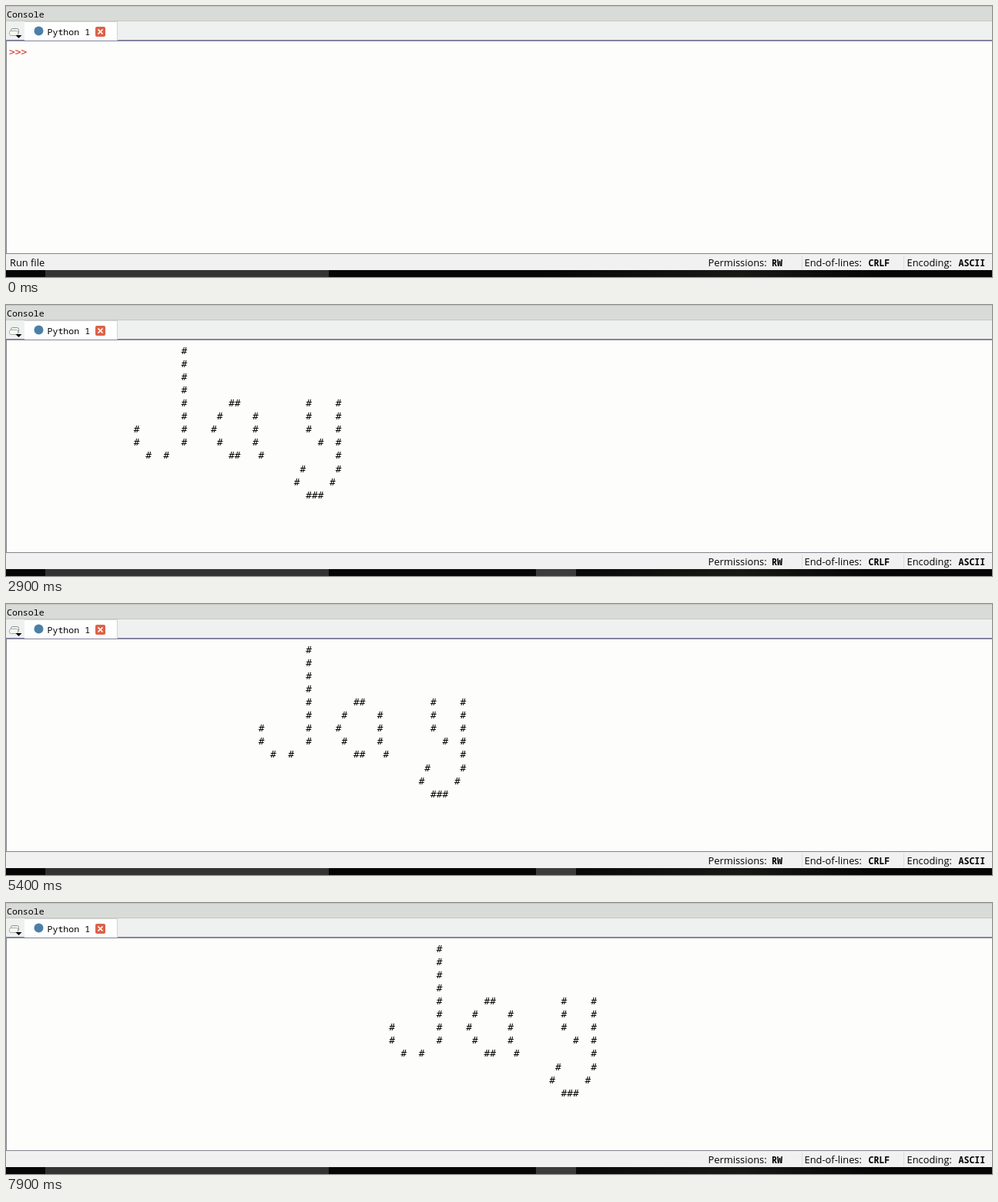
Write an HTML page with a canvas that moves like this. It is 1280x353 px and loops after 8000 ms.

```html
<!DOCTYPE html>
<html lang="en">
<head>
<meta charset="utf-8">
<title>Console</title>
<style>
  html, body { margin: 0; width: 100%; height: 100%; overflow: hidden; background: #fff; }
  canvas { display: block; width: 1280px; height: 353px; }
</style>
</head>
<body>
<canvas id="stage" width="1280" height="353"></canvas>
<script>
const ctx = document.getElementById('stage').getContext('2d');
const LOOP = 8000;
const CODE = '12.8px "DejaVu Sans Mono", monospace';
const TITLE = '11.6px "Noto Sans Mono", monospace';
const LABEL = '12.85px "Open Sans", sans-serif';
const VALUE = 'bold 11.6px "Noto Sans Mono", monospace';
const CELL = 7.706, LINE = 17.1, LEFT = 4, BASE = 63.6;

const art = [
  '        #',
  '        #',
  '        #',
  '        #',
  '        #       ##           #    #',
  '        #     #     #        #    #',
  '#       #    #      #        #    #',
  '#       #     #     #          #  #',
  '  #  #          ##   #            #',
  '                            #     #',
  '                           #     #',
  '                             ###'
];

// [time, indent]: the printing speed wavers a little
const pace = [[600, 0], [900, 3], [2000, 13], [3800, 29], [4600, 35],
              [4800, 37], [6100, 49], [7300, 58], [7900, 64], [8000, 65]];
const ART_START = 600, HINT_END = 1500, BUTTON_START = 300;

function indentAt(t) {
  let i = 1;
  while (i < pace.length - 1 && t >= pace[i][0]) i++;
  const [t0, c0] = pace[i - 1], [t1, c1] = pace[i];
  return Math.floor(c0 + (c1 - c0) * (t - t0) / (t1 - t0) + 1e-6);
}

function rect(x, y, w, h, color) {
  ctx.fillStyle = color;
  ctx.fillRect(x, y, w, h);
}

function text(str, x, y, font, color = '#000') {
  ctx.font = font;
  ctx.fillStyle = color;
  ctx.fillText(str, x, y);
}

function path(points, color, width) {
  ctx.beginPath();
  points.forEach(([x, y], i) => i ? ctx.lineTo(x, y) : ctx.moveTo(x, y));
  if (width) {
    ctx.strokeStyle = color;
    ctx.lineWidth = width;
    ctx.stroke();
  } else {
    ctx.fillStyle = color;
    ctx.fill();
  }
}

function box(x, y, w, h, r, fill, stroke) {
  ctx.beginPath();
  ctx.roundRect(x, y, w, h, r);
  ctx.fillStyle = fill;
  ctx.fill();
  if (stroke) {
    ctx.strokeStyle = stroke;
    ctx.lineWidth = 1;
    ctx.stroke();
  }
}

function drawConsole(t) {
  rect(0, 46, 1280, 277, '#fdfefb');
  rect(0, 45, 1, 278, '#85858d');
  rect(0, 322, 1280, 1, '#85858d');
  if (t < ART_START) {
    text('>>>', LEFT, BASE, CODE, '#d9261c');
    return;
  }
  const x = LEFT + indentAt(t) * CELL;
  art.forEach((row, i) => text(row, x, BASE + i * LINE, CODE));
}

function drawHeader() {
  rect(0, 0, 1280, 20, '#d9dbd8');
  rect(0, 0, 1280, 1, '#c3c5bd');
  rect(0, 19, 1280, 1, '#c6c8c2');
  text('Console', 1, 15, TITLE);

  rect(0, 20, 1280, 24, '#eff0f0');
  rect(0, 44, 1280, 2, '#85839f');
  rect(24, 20, 121, 25, '#d2d4d4');
  rect(24, 21, 120, 24, '#fdfefd');

  box(6.5, 29.5, 10, 7, 2, '#f3f4ee', '#8b928f');
  box(4.5, 32.5, 11, 6, 2, '#f6f8f2', '#a5aca6');
  path([[12.5, 38], [20.5, 38], [16.5, 42]], '#000');

  box(36.5, 26.5, 12, 12, 6, '#4b7fa8');
  text('Python 1', 53.5, 38, TITLE);
  box(116, 27, 13, 13, 2, '#dc6248');
  path([[119.5, 30.5], [125.5, 36.5]], '#fff', 1.7);
  path([[125.5, 30.5], [119.5, 36.5]], '#fff', 1.7);
}

function drawStatus(t) {
  rect(0, 323, 1280, 21, '#f0f1f0');
  rect(1033, 325, 1, 18, '#dedfdd');
  rect(1165, 325, 1, 18, '#dedfdd');
  if (t < HINT_END) text('Run file', 5, 338.5, LABEL);
  text('Permissions:', 911.5, 339, LABEL);
  text('RW', 994, 339, VALUE);
  text('End-of-lines:', 1036.5, 339, LABEL);
  text('CRLF', 1119.5, 339, VALUE);
  text('Encoding:', 1169.5, 339, LABEL);
  text('ASCII', 1236.5, 339, VALUE);
}

function drawTaskbar(t) {
  rect(0, 344, 1280, 9, '#060607');
  const glow = ctx.createLinearGradient(700, 0, 1120, 0);
  glow.addColorStop(0, '#060607');
  glow.addColorStop(0.6, '#181815');
  glow.addColorStop(1, '#060607');
  rect(700, 344, 420, 9, glow);
  rect(51, 344, 368, 9, '#333333');
  if (t >= BUTTON_START) rect(688, 344, 52, 9, '#3c3c3d');
}

const start = performance.now();
function frame(now) {
  const t = Math.max(0, now - start) % LOOP;
  drawConsole(t);
  drawHeader();
  drawStatus(t);
  drawTaskbar(t);
  requestAnimationFrame(frame);
}
requestAnimationFrame(frame);
</script>
</body>
</html>
```
